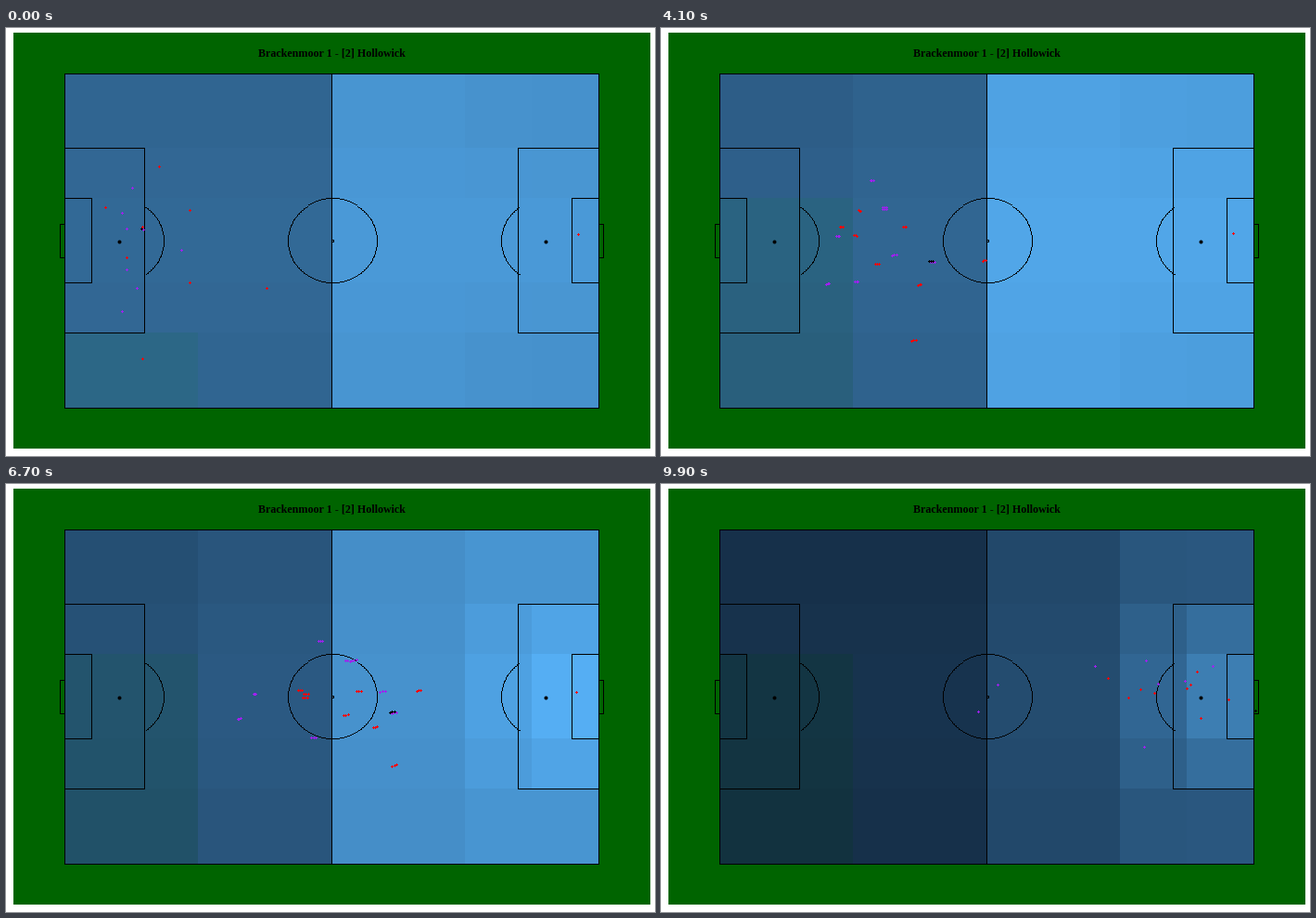
A matplotlib script for the animation above (10 s loop, 700 px wide and 461 px high).

```python
import numpy as np
import matplotlib.pyplot as plt
from matplotlib.animation import FuncAnimation
from matplotlib.colors import LinearSegmentedColormap, to_rgba
from matplotlib.patches import Rectangle

W, H, DPI = 700, 461, 100
PX = 72 / DPI
FRAMES, STEP_MS = 100, 100
END, HALF = 9.9, 5.4
CX, CY = 351, 229
GOAL = np.array([643, 245])

# Each run: start, place at HALF, finish
RED = [
    [(281, 280), (391, 236), (578, 202)],
    [(147, 356), (341, 322), (582, 252)],
    [(198, 274), (331, 272), (567, 220)],
    [(130, 247), (294, 253), (532, 225)],
    [(198, 196), (312, 220), (571, 216)],
    [(107, 193), (249, 220), (482, 209)],
    [(147, 214), (257, 227), (504, 230)],
    [(165, 149), (258, 214), (517, 221)],
    [(617, 222), (616, 222), (612, 232)],
]
PURPLE = [
    [(148, 217), (298, 190), (536, 215)],
    [(189, 239), (351, 252), (565, 212)],
    [(136, 172), (279, 164), (468, 196)],
    [(125, 199), (304, 191), (523, 190)],
    [(130, 260), (322, 235), (595, 196)],
    [(141, 280), (262, 272), (521, 283)],
    [(130, 216), (226, 226), (363, 216)],
    [(125, 305), (212, 263), (342, 245)],
]
PASSER, SCORER = len(RED), len(RED) + 1
START, MID, FINISH = np.array(RED + PURPLE, float).transpose(1, 0, 2)

COLS = [63, 207, 351, 495, 567, 639]
ROWS = [49, 129, 183, 274, 328, 409]
FLANK = np.array([1, .4, 0, .4, 1])
BLUES = LinearSegmentedColormap.from_list("blues", ["#132B43", "#336A98", "#56B1F7"])
TEAL_SHIFT = np.array([-4, 2, -11]) / 255


def ease(t):
    u = t / END
    return u * u * (2 - u)


def ramp(t, t0, t1):
    return min(max((t - t0) / (t1 - t0), 0), 1)


S_HALF = ease(HALF)
BEND = (MID - START - (FINISH - START) * S_HALF) / (S_HALF * (1 - S_HALF))


def positions(t):
    """All players, then the ball: one pass, a dribble and the shot."""
    t = min(t, END)
    s = ease(t)
    men = START + (FINISH - START) * s + BEND * s * (1 - s)
    ball = men[PASSER] + (men[SCORER] - men[PASSER]) * ramp(t, 1.7, 4.1)
    ball = ball + (GOAL - ball) * ramp(t, 9.2, END)
    return np.vstack([men, ball + [-2, -1]])


def zone_colors(t):
    u = t / END
    own = .49 - .42 * u ** np.array([2.2, 3.2])
    # The value contracts towards goal each time the ball enters a new zone
    pull = .2 * (t >= 5.4) + .18 * (t >= 7.8)
    level = np.interp(t, [0, 6.7, 7.8, END], [.83, .98, .92, .64])
    attack = level - pull * np.array([1, .45, 0])
    dip = np.array([.03, .03, .03, .05 + .2 * pull, .06 + .6 * pull])
    val = np.concatenate([own, attack]) - np.outer(FLANK, dip)
    rgb = BLUES(val)[..., :3]
    rgb[4 if t < 2.9 else 2:, 0] += TEAL_SHIFT
    return np.clip(rgb, 0, 1)


fig = plt.figure(figsize=(W / DPI, H / DPI), dpi=DPI, facecolor="white")
ax = fig.add_axes([0, 0, 1, 1])
ax.set(xlim=(0, W), ylim=(H, 0))
ax.axis("off")
ax.set_autoscale_on(False)


def line(x, y):
    ax.plot(x, y, color="black", lw=PX, antialiased=False, zorder=3)


def box(x0, y0, x1, y1):
    line([x0, x1, x1, x0, x0], [y0, y0, y1, y1, y0])


def arc(cx, a0, a1, rx=48, ry=45):
    """Hard-edged arc, one pixel at a time."""
    a = np.radians(np.arange(a0, a1, 1.2))
    ax.plot(np.round(cx + rx * np.cos(a)) + .5, np.round(CY + ry * np.sin(a)) + .5,
            ls="none", marker=",", color="black", zorder=3)


ax.add_patch(Rectangle((8, 5), 687, 448, color="#006400", lw=0))
mesh = ax.pcolormesh(COLS, ROWS, zone_colors(0), antialiased=False, zorder=2)

box(63, 49, 639, 409)
line([CX, CX], [49, 409])
for edge, depth in ((63, 86), (639, -87)):
    side = np.sign(depth)
    box(edge, 129, edge + depth, 328)
    box(edge, 183, edge + side * 29, 274)
    box(edge, 211, edge - side * 5, 247)
arc(CX, 0, 360)
arc(CX, 0, 360, 1.5, 1.5)
arc(121, -54, 54)
arc(581, 126, 234)
ax.scatter([121.5, 581.5], [CY + .5] * 2, s=(4 * PX) ** 2, c="black", lw=0, zorder=3)
ax.text(CX, 28, "Brackenmoor 1 - [2] Hollowick", family="Liberation Serif",
        weight="bold", size=12 * PX, ha="center", va="center")

LAGS = (0, .045, .09)
TEAM = np.array([to_rgba("#ff0000")] * len(RED)
                + [to_rgba("#a020f0")] * len(PURPLE) + [to_rgba("black")])
dots = ax.scatter([], [], s=(1.3 * PX) ** 2, lw=0, antialiased=False, zorder=4)
dots.set_facecolors(np.tile(TEAM, (len(LAGS), 1)))


def draw(n):
    t = n * STEP_MS / 1000
    mesh.set_array(zone_colors(t))
    dots.set_offsets(np.round(np.vstack([positions(t + lag) for lag in LAGS])) + .5)
    return mesh, dots


anim = FuncAnimation(fig, draw, frames=FRAMES, interval=STEP_MS,
                     repeat=True, repeat_delay=0, blit=False)
plt.show()
```
